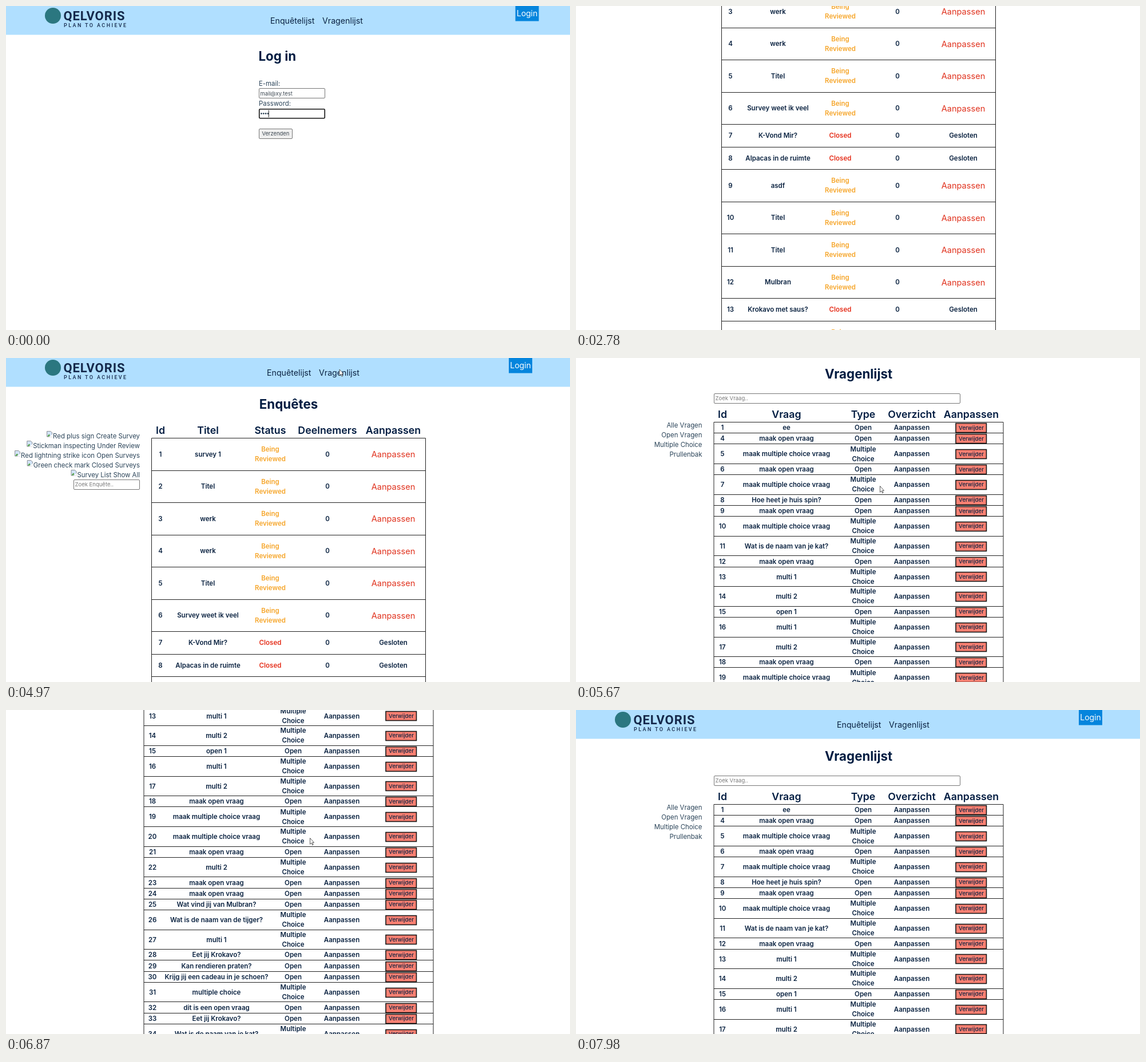
An HTML page for the animation above (8000 ms loop, 986 by 568 pixels).

```html
<!DOCTYPE html>
<html lang="nl">
<head>
<meta charset="utf-8">
<title>Enquêtes</title>
<style>
html, body { margin: 0; width: 100%; height: 100%; overflow: hidden; background: #fff; }
svg { display: block; width: 986px; height: 568px; }
text { font-family: Inter, "Open Sans", sans-serif; fill: #0a2240; white-space: pre; }
.title { font-size: 22.3px; font-weight: 700; fill: #031d42; }
.head { font-size: 17.8px; font-weight: 600; fill: #031d42; }
.cell { font-size: 11.5px; font-weight: 600; }
.wait { fill: #f6a62b; }
.closed { fill: #e5301c; }
.link { font-size: 14.6px; fill: #e0331f; }
.nav { font-size: 14.2px; }
.login { font-size: 14px; fill: #fff; }
.side { font-size: 11.4px; fill: #2b4459; }
.field { font-size: 9.4px; fill: #3b4650; }
.hint { font-size: 9.5px; fill: #7b7b7b; }
.del { font-size: 9.6px; font-weight: 500; }
.brand { font: 700 22px Roboto, sans-serif; letter-spacing: .9px; fill: #15294b; }
.motto { font: 500 9px Roboto, sans-serif; letter-spacing: 2.4px; fill: #15294b; }
</style>
</head>
<body>
<svg id="stage" viewBox="0 0 986 568"></svg>
<script>
const LOOP = 8000, STEP = 80;
const stage = document.getElementById('stage');

function add(parent, tag, attrs = {}) {
  const el = document.createElementNS('http://www.w3.org/2000/svg', tag);
  for (const key in attrs) el.setAttribute(key, attrs[key]);
  return parent.appendChild(el);
}

// y is the middle of the capital letters
function label(parent, str, x, y, cls, anchor = 'start') {
  const el = add(parent, 'text', { x, y, dy: '.36em', class: cls, 'text-anchor': anchor });
  el.textContent = str;
  return el;
}
const mid = (parent, str, x, y, cls) => label(parent, str, x, y, cls, 'middle');

function box(parent, x, y, width, height, fill, stroke = 'none', line = 1, rx = 0) {
  return add(parent, 'rect', { x, y, width, height, fill, stroke, 'stroke-width': line, rx });
}
const input = (parent, x, y, w) => box(parent, x, y, w, 17, '#fff', '#767676', 1, 1.5);

function page(navX, loginX) {
  const g = add(stage, 'g');
  box(g, 0, 0, 986, 50.5, '#b0dfff');
  add(g, 'circle', { cx: 82, cy: 17, r: 14, fill: '#2b7780' });
  label(g, 'QELVORIS', 100.5, 17.3, 'brand');
  label(g, 'PLAN TO ACHIEVE', 101, 34, 'motto');
  label(g, 'Enquêtelijst', navX, 25.5, 'nav');
  label(g, 'Vragenlijst', navX + 91, 25.5, 'nav');
  box(g, loginX, 0, 41, 26.5, '#0585dd');
  mid(g, 'Login', loginX + 20.5, 13, 'login');
  return g;
}

// Draws heads, rules and rows; fill(row, y, i) draws one row around its middle
function table(g, left, right, top, xs, names, rows, height, fill) {
  names.forEach((name, i) => mid(g, name, xs[i], top - 13.5, 'head'));
  const rule = y => `M${left} ${Math.floor(y) + .5}H${right}`;
  let y = top, d = rule(y);
  rows.forEach((row, i) => {
    const h = height(row);
    fill(row, y + h / 2, i);
    y += h;
    d += rule(y);
  });
  d += `M${left} ${top}V${y}M${right} ${top}V${y}`;
  add(g, 'path', { d, fill: 'none', stroke: '#222' });
}

// Login page
const login = page(462, 890.5);
label(login, 'Log in', 441.5, 88, 'title');
label(login, 'E-mail:', 442, 135.5, 'side');
input(login, 442.5, 144.5, 115);
label(login, 'mail@xy.test', 444.5, 153.5, 'field');
label(login, 'Password:', 442, 171, 'side');
box(login, 442.75, 180.75, 114.5, 16, '#fff', '#101010', 1.6, 1.5);
for (let i = 0; i < 4; i++) add(login, 'circle', { cx: 446.5 + 3.8 * i, cy: 188.6, r: 1.3, fill: '#22384c' });
const caret = box(login, 458.8, 182.5, 1, 12.5, '#222');
const send = box(login, 442.5, 215.5, 58, 17, '#efefef', '#767676', 1, 1.5);
mid(login, 'Verzenden', 471.3, 224, 'field');

// Survey page; a leading "!" marks a closed survey
const surveys = page(456, 879);
mid(surveys, 'Enquêtes', 494, 81, 'title');
const surveyX = [270, 353, 462, 562, 677];
const surveyRows = ['survey 1', 'Titel', 'werk', 'werk', 'Titel', 'Survey weet ik veel', '!K-Vond Mir?',
  '!Alpacas in de ruimte', 'asdf', 'Titel', 'Titel', 'Mulbran', '!Krokavo met saus?', 'Titel', 'Titel'];
const isClosed = row => row[0] === '!';
table(surveys, 254.5, 733.5, 140.5, surveyX, ['Id', 'Titel', 'Status', 'Deelnemers', 'Aanpassen'],
  surveyRows, row => isClosed(row) ? 39.5 : 56.5, (row, y, i) => {
    const [id, title, status, count, action] = surveyX;
    mid(surveys, i + 1, id, y, 'cell');
    mid(surveys, row.replace('!', ''), title, y, 'cell');
    mid(surveys, 0, count, y, 'cell');
    if (isClosed(row)) {
      mid(surveys, 'Closed', status, y, 'cell closed');
      mid(surveys, 'Gesloten', action, y, 'cell');
    } else {
      mid(surveys, 'Being', status, y - 8.5, 'cell wait');
      mid(surveys, 'Reviewed', status, y + 8.5, 'cell wait');
      mid(surveys, 'Aanpassen', action, y, 'link');
    }
  });

const plain = add(surveys, 'g'), alts = add(surveys, 'g');
[['Red plus sign', 'Create Survey'], ['Stickman inspecting', 'Under Review'],
 ['Red lightning strike icon', 'Open Surveys'], ['Green check mark', 'Closed Surveys'],
 ['Survey List', 'Show All']].forEach(([alt, name], i) => {
  const y = 136.5 + 17 * i;
  label(plain, name, 234, y, 'side', 'end');
  const full = label(alts, alt + ' ' + name, 234, y, 'side', 'end');
  const icon = add(alts, 'g', { transform: `translate(${223 - full.getComputedTextLength()} ${y - 8.5})` });
  add(icon, 'path', { d: 'M.5 .5H7L9.5 3V10H.5Z', fill: '#d3e4f8', stroke: '#8b8f94' });
  add(icon, 'path', { d: 'M1 9.5L4 5.5L6 7.5L3.5 9.5Z', fill: '#4f9e3c' });
  add(icon, 'path', { d: 'M4.5 10.5L10 5.5V10.5Z', fill: '#fff' });
});
input(surveys, 118.5, 213.5, 115);
label(surveys, 'Zoek Enquête..', 120.5, 222, 'hint');

// Question page; a leading "*" marks multiple choice
const questions = page(456, 879);
mid(questions, 'Vragenlijst', 494, 81, 'title');
input(questions, 241.5, 115.5, 430);
label(questions, 'Zoek Vraag..', 243.5, 124, 'hint');
['Alle Vragen', 'Open Vragen', 'Multiple Choice', 'Prullenbak'].forEach((name, i) =>
  label(questions, name, 220.5, 171 + 17 * i, 'side', 'end'));
const questX = [256, 368, 502, 587, 691];
const OPEN = 'maak open vraag', MULTI = '*maak multiple choice vraag', CAT = '*Wat is de naam van je kat?';
const questRows = ['ee', OPEN, MULTI, OPEN, MULTI, 'Hoe heet je huis spin?', OPEN, MULTI, CAT, OPEN,
  '*multi 1', '*multi 2', 'open 1', '*multi 1', '*multi 2', OPEN, MULTI, MULTI, OPEN, '*multi 2',
  OPEN, OPEN, 'Wat vind jij van Mulbran?', '*Wat is de naam van de tijger?', '*multi 1',
  'Eet jij Krokavo?', 'Kan rendieren praten?', 'Krijg jij een cadeau in je schoen?',
  '*multiple choice', 'dit is een open vraag', 'Eet jij Krokavo?', CAT, OPEN, OPEN];
const isMulti = row => row[0] === '*';
table(questions, 241, 747, 165.5, questX, ['Id', 'Vraag', 'Type', 'Overzicht', 'Aanpassen'],
  questRows, row => isMulti(row) ? 34.6 : 19.2, (row, y, i) => {
    const [id, text, type, edit, action] = questX;
    mid(questions, i ? i + 3 : 1, id, y, 'cell');
    mid(questions, row.replace('*', ''), text, y, 'cell');
    if (isMulti(row)) {
      mid(questions, 'Multiple', type, y - 8.7, 'cell');
      mid(questions, 'Choice', type, y + 8.3, 'cell');
    } else mid(questions, 'Open', type, y, 'cell');
    mid(questions, 'Aanpassen', edit, y, 'cell');
    box(questions, action - 27, Math.round(y) - 7.5, 53.5, 16, '#fa8072', '#161616', 1.6);
    mid(questions, 'Verwijder', action, y, 'del');
  });

const cursor = add(stage, 'path', {
  d: 'M0 0V10.8L2.5 8.5L4.1 12.4L5.7 11.7L4.1 7.9H7Z',
  fill: '#fff', stroke: '#333', 'stroke-width': .8, 'stroke-linejoin': 'round'
});

// Moves: start, end, goal, easing
const linear = p => p, slowing = p => 1 - (1 - p) ** 2, gaining = p => p ** 2.32;
const scrolls = [
  [2540, 2780, [272], slowing],
  [2960, 3100, [320], slowing],
  [3680, 3920, [156], slowing],
  [4080, 4320, [0], slowing],
  [5510, 5900, [266], gaining],
  [6070, 6390, [487], slowing],
  [6870, 7420, [0], linear]
];
const trips = [
  [660, 1070, [479, 228], linear],
  [1220, 1300, [479, 242], linear],
  [4650, 4890, [583, 20], slowing],
  [5130, 5430, [531.5, 224.5], slowing],
  [7830, 7980, [488, 22], linear]
];

// The screen refreshes in even steps of about STEP, the first one at the start of a move
function follow(from, moves, t) {
  for (const [start, end, goal, ease] of moves) {
    if (t < start) break;
    const gaps = Math.round((end - start) / STEP);
    const done = Math.min(gaps, Math.floor((t - start) / (end - start) * gaps));
    const p = ease((done + 1) / (gaps + 1));
    from = from.map((v, i) => v + (goal[i] - v) * p);
  }
  return from;
}

const show = (el, on) => el.setAttribute('display', on ? 'inline' : 'none');
const within = (t, a, b) => t >= a && t < b;

function draw(t) {
  const current = t < 1220 ? login : t < 5050 ? surveys : questions;
  const [scroll] = follow([0], scrolls, t);
  for (const p of [login, surveys, questions]) show(p, p === current);
  current.setAttribute('transform', `translate(0 ${-Math.round(scroll)})`);
  show(caret, !within(t, 500, 980));
  send.setAttribute('fill', t < 980 ? '#efefef' : '#e5e5e5');
  show(alts, t >= 1470);
  show(plain, t < 1470);
  show(cursor, within(t, 660, 1470) || within(t, 4650, 7980));
  cursor.setAttribute('transform', `translate(${follow([625, 328], trips, t)})`);
}

const start = performance.now();
function tick() {
  draw((performance.now() - start) % LOOP);
  requestAnimationFrame(tick);
}
tick();
</script>
</body>
</html>
```
